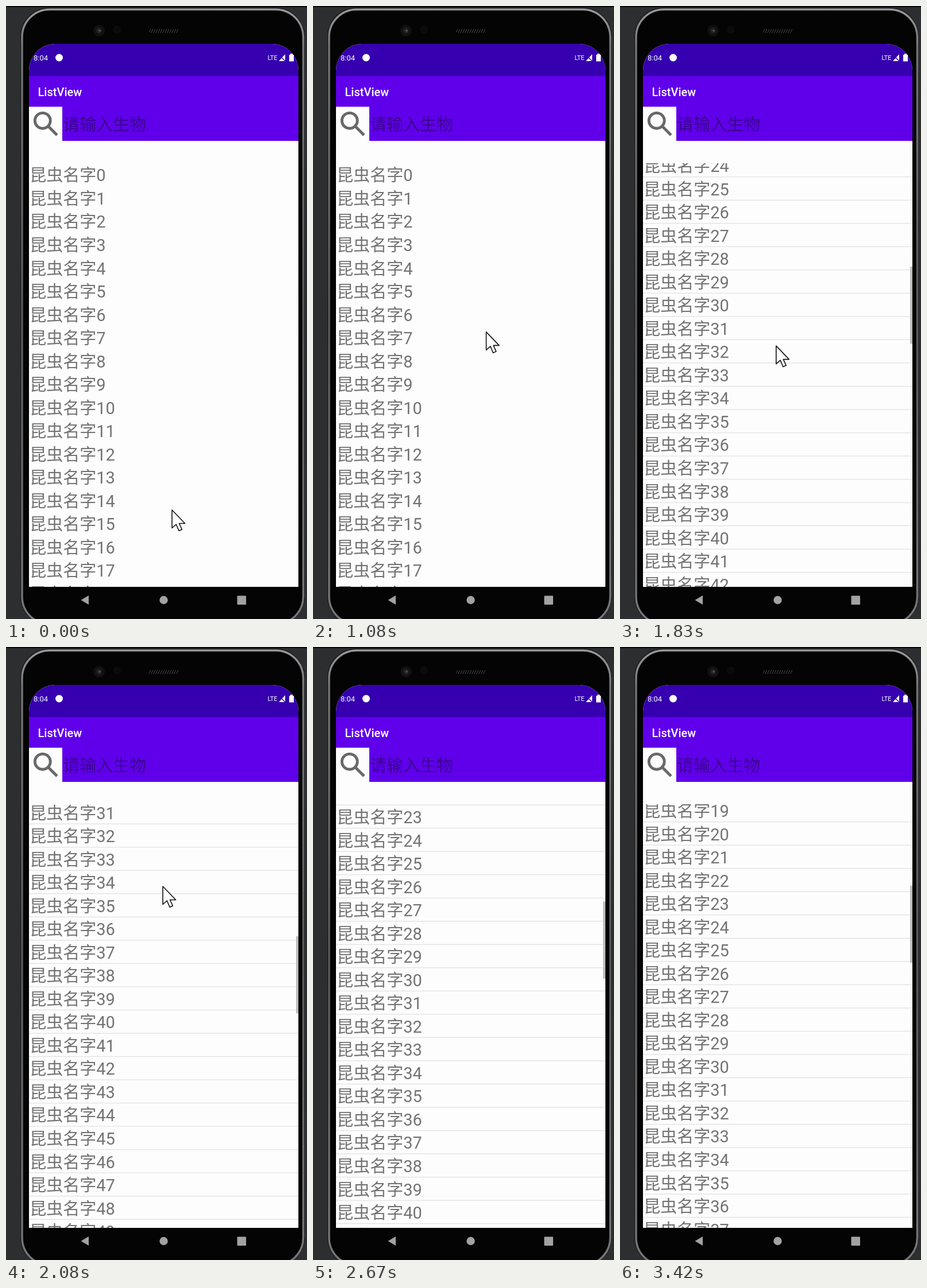
These frames come from a looping animation (524 px wide and 1068 px high, 3510 ms). An HTML page:

```html
<!DOCTYPE html>
<html lang="zh">
<head>
<meta charset="utf-8">
<title>ListView</title>
<style>
  html, body { margin: 0; width: 100%; height: 100%; overflow: hidden; background: #2d2e30; }
  svg { display: block; width: 524px; height: 1068px; }
  text { font-family: Roboto, "Noto Sans CJK SC", "Noto Sans CJK", sans-serif; white-space: pre; }
  .big { font-size: 29px; }
  .status { fill: #fff; font-size: 13px; }
</style>
</head>
<body>
<svg viewBox="0 0 524 1068">
  <defs>
    <linearGradient id="rim" x1="0" y1="0" x2="0" y2="1">
      <stop offset="0" stop-color="#99999b"/>
      <stop offset=".06" stop-color="#747476"/>
      <stop offset=".5" stop-color="#58585a"/>
      <stop offset="1" stop-color="#77777a"/>
    </linearGradient>
    <pattern id="mesh" width="4" height="8" patternUnits="userSpaceOnUse">
      <path d="M0 8L4 0" stroke="#4a4a4a"/>
    </pattern>
    <clipPath id="screen"><path d="M40 1012V113A46 47 0 0 1 86 66H463A46 47 0 0 1 509 113V1012Z"/></clipPath>
    <clipPath id="view"><rect x="40" y="274" width="469" height="738"/></clipPath>
  </defs>

  <rect width="524" height="1068" fill="#2d2e30"/>
  <rect width="524" height="2" fill="#080808"/>

  <!-- Phone body -->
  <rect x="25" y="3" width="495" height="1076" rx="50" fill="#161617"/>
  <rect x="28" y="6" width="489.5" height="1071" rx="48" fill="#040404" stroke="url(#rim)" stroke-width="3.5"/>
  <circle cx="162" cy="43" r="10" fill="#111"/>
  <circle cx="162" cy="43" r="5" fill="#222"/>
  <circle cx="163" cy="43" r="1.8" fill="#555"/>
  <circle cx="193" cy="41" r="7" fill="#0b0b0b"/>
  <rect x="249" y="40" width="52" height="7" rx="3" fill="url(#mesh)"/>

  <!-- App bars -->
  <g clip-path="url(#screen)">
    <rect x="40" y="66" width="469" height="946" fill="#fdfdfd"/>
    <rect x="40" y="66" width="469" height="56" fill="#3600b0"/>
    <rect x="40" y="122" width="469" height="113" fill="#6000eb"/>
    <rect x="40" y="175.5" width="58" height="60" fill="#fdfdfd"/>
  </g>
  <text class="status" x="48" y="94.500">8:04</text>
  <circle cx="92.5" cy="90" r="6.5" fill="#fff"/>
  <text class="status" x="455.5" y="94" style="font-size:10.8px">LTE</text>
  <path d="M475 96H486V84Z" fill="#fff"/>
  <path d="M476 86L487 97" stroke="#3600b0" stroke-width="1.5"/>
  <path d="M493 85H495V83H499V85H501V96.5H493Z" fill="#fff"/>
  <text x="55.5" y="156.5" fill="#fff" font-size="20" font-weight="500">ListView</text>
  <g transform="translate(40.6 176.6) scale(2.44)" fill="none" stroke="#686868" stroke-width="2">
    <circle cx="9.5" cy="9.5" r="5.5"/>
    <path d="M13.5 13.5L19.8 19.8"/>
  </g>
  <text class="big" x="99" y="217" fill="#000" fill-opacity=".39">请输入生物</text>

  <!-- List -->
  <g clip-path="url(#view)" fill="#737373">
    <g id="list"></g>
    <rect id="thumb" x="505" width="4" fill="#bdbdbd"/>
  </g>

  <!-- Navigation -->
  <g fill="#a2a2a2">
    <path d="M130.5 1035L144 1027V1043Z"/>
    <circle cx="274.5" cy="1035" r="7.2"/>
    <rect x="402.5" y="1027.5" width="15.5" height="15.5" rx="1"/>
  </g>

  <path id="cursor" d="M0 0V31.5L7.3 25L12 36.3L17.3 34L12.5 23.5H22.5Z"
    fill="#fff" stroke="#111" stroke-width="1.6" stroke-linejoin="round"/>
</svg>
<script>
  const LOOP = 3510, FRAMES = 42, PITCH = 40.53, ROWS = 100;
  const TOP = 274, HEIGHT = 738, RATIO = HEIGHT / (ROWS * PITCH);
  const $ = id => document.getElementById(id);
  const list = $('list'), thumb = $('thumb'), cursor = $('cursor');

  function add(tag, attrs, text = '') {
    const el = document.createElementNS(list.namespaceURI, tag);
    for (const name in attrs) el.setAttribute(name, attrs[name]);
    el.textContent = text;
    list.append(el);
    return el;
  }

  const rules = [];
  for (let i = 0; i < ROWS; i++) {
    add('text', { class: 'big', x: 41.3, y: 305.4 + i * PITCH }, '昆虫名字' + i);
    rules.push(add('rect', { x: 40, y: 313.4 + i * PITCH, width: 469, height: 1.2, fill: '#e0e0e0' }));
  }
  thumb.setAttribute('height', HEIGHT * RATIO);

  // Each fling coasts to its distance with exponential friction
  const FRICTION = 180;
  const flings = [
    { at: 1250, distance: 729 },
    { at: 1718, distance: 624 },
    { at: 2436, distance: -576 }
  ];
  const scrollAt = t => flings.reduce((sum, { at, distance }) =>
    sum + distance * (1 - Math.exp(-Math.max(0, t - at) / FRICTION)), 0);

  // Turning points of the hand, eased in between
  const turns = [
    { at: 0, x: 289, y: 878 },
    { at: 420, x: 300, y: 890 },
    { at: 700, x: 300, y: 890 },
    { at: 1250, x: 302, y: 473 },
    { at: 1500, x: 270, y: 858 },
    { at: 2080, x: 273, y: 417 },
    { at: 2657, x: 155, y: 1075 }
  ];
  function pointerAt(t) {
    const n = turns.findIndex(turn => turn.at > t);
    if (n < 0) return turns[turns.length - 1];
    const a = turns[n - 1], b = turns[n];
    const p = (t - a.at) / (b.at - a.at), e = p * p * (3 - 2 * p);
    return { x: a.x + (b.x - a.x) * e, y: a.y + (b.y - a.y) * e };
  }

  // Pictures change twelve times a second, on whole hundredths
  function hold(t) {
    const step = Math.floor((Math.floor(t / 10) * 10 + 3.4) * .012);
    return Math.round(Math.min(FRAMES - 1, step) * 25 / 3) * 10;
  }

  const start = performance.now();
  function draw() {
    const t = hold((performance.now() - start) % LOOP);
    const scroll = scrollAt(t), { x, y } = pointerAt(t), moved = Math.min(1, scroll / 50);
    list.setAttribute('transform', `translate(0 ${-scroll})`);
    rules.forEach(rule => rule.setAttribute('opacity', moved));
    thumb.setAttribute('y', TOP + scroll * RATIO);
    thumb.setAttribute('opacity', moved);
    cursor.setAttribute('transform', `translate(${x} ${y})`);
    requestAnimationFrame(draw);
  }
  draw();
</script>
</body>
</html>
```
